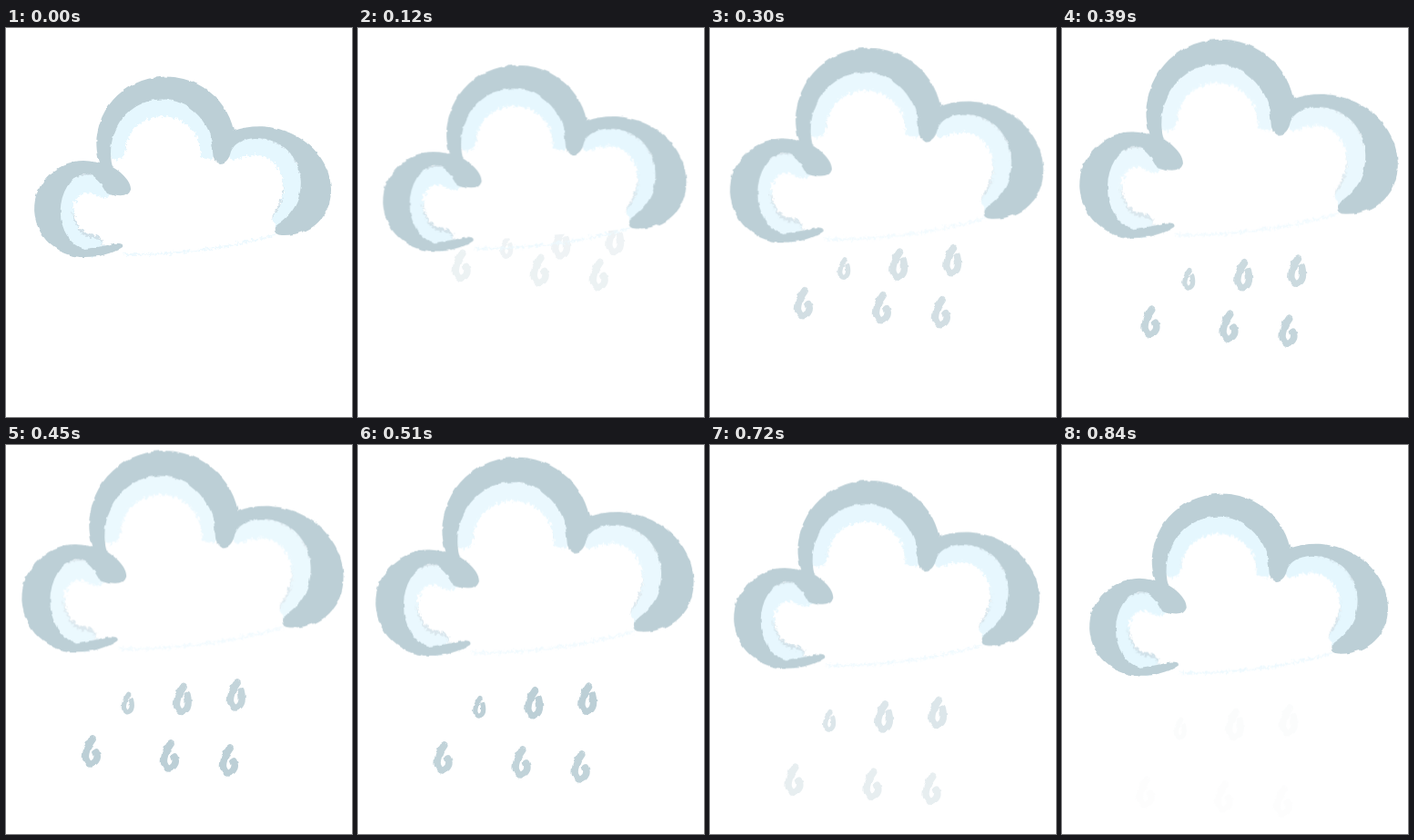
Animation, 380 px wide and 428 px high, one loop 870 ms. Source, as an HTML page:

```html
<!DOCTYPE html>
<html lang="en">
<head>
<meta charset="utf-8">
<title>Rain cloud</title>
<style>
html, body { margin: 0; width: 100%; height: 100%; overflow: hidden; background: #fff; }
svg { display: block; width: 380px; height: 428px; }
path { fill: none; stroke-linecap: round; stroke-linejoin: round; }
</style>
</head>
<body>
<svg viewBox="0 0 380 428">
  <defs>
    <filter id="brush" x="-100%" y="-100%" width="300%" height="300%" color-interpolation-filters="sRGB">
      <feTurbulence type="fractalNoise" baseFrequency=".11" numOctaves="2" seed="4"/>
      <feDisplacementMap in="SourceGraphic" scale="3.5" xChannelSelector="R" yChannelSelector="G"/>
    </filter>
    <filter id="chalk" x="-20%" y="-20%" width="140%" height="140%" color-interpolation-filters="sRGB">
      <feTurbulence type="fractalNoise" baseFrequency=".3" numOctaves="3" seed="9"/>
      <feDisplacementMap in="SourceGraphic" scale="8" xChannelSelector="R" yChannelSelector="G"/>
    </filter>
  </defs>
  <g id="rain"></g>
  <g id="cloud">
    <g id="body"></g>
    <g id="glow" filter="url(#chalk)"></g>
    <g id="rim" filter="url(#brush)"></g>
  </g>
</svg>
<script>
const GREY = '#bccfd6', PALE = '#e5f7fe', MIST = '#d0e0e8';
const STEP = 30, LOOP = 870, PEAK = 450, END = 840;
const $ = id => document.getElementById(id);
const clamp = v => Math.max(0, Math.min(1, v));
const mix = (a, b, u) => a + (b - a) * u;

function add(parent, d, attrs) {
  const path = document.createElementNS('http://www.w3.org/2000/svg', 'path');
  path.setAttribute('d', d);
  for (const name in attrs) path.setAttribute(name, attrs[name]);
  return $(parent).appendChild(path);
}
const fill = (parent, d, color) => add(parent, d, { style: 'fill:' + color });
const stroke = (parent, d, color, width, more) =>
  add(parent, d, { stroke: color, 'stroke-width': width, ...more });

// Three lobes seen from outside, then the way back along their inner edges
const outside = `M128,241 Q112,252 86,252 A54,53 0 1 1 103,149 A76,73 0 1 1 250,113
  C300,95 357,130 357,178 C357,208 335,229 303,228`;
const inside = `Q293,228 295,218 C340,195 332,121 273,121 Q252,123 247,136
  Q244,149 235,149 Q227,147 227,136 A56,59 0 1 0 117,153
  C117,153 138,165 137,178 Q133,190 111,182 C105,172 100,161 86,160
  A31,42 0 0 0 86,243 Q105,241 118,237 Q130,236 128,241Z`;
const lobes = [
  'M106,174 C75,155 55,190 67,216 Q76,238 96,238',
  'M121,132 A51,48 0 0 1 223,132',
  'M251,132 C300,110 335,165 303,208'
];

fill('body', outside, '#fff');
for (const lobe of lobes) {
  stroke('glow', lobe, MIST, 21);
  stroke('glow', lobe, PALE, 20, { transform: 'translate(0 3)' });
}
stroke('glow', 'M130,249 Q220,250 297,227', '#edf9fe', 2);
fill('rim', outside + inside, GREY);

// Two rows of drops: start, shift at the peak and at the end, opacity by time
const rows = [
  { xs: [174, 234, 293], y: 226, dy: -4.5, peak: [-40, 58], end: [-44, 86], hook: -5,
    alpha: t => Math.min(t / 510, (855 - t) / 266) },
  { xs: [121, 207, 272], y: 234, dy: 5, peak: [-27, 103], end: [-29, 148], hook: 1,
    alpha: t => Math.min(t / 450, (848 - t) / 370) }
];
const drops = rows.flatMap((row, r) => row.xs.map((x, i) => {
  const shape = `M1,-14 C-4,-8 -8,4 -6,9 S-1,15 2,13 S8,7 5,${row.hook}`;
  const node = stroke('rain', shape, GREY, 7.5, { filter: 'url(#brush)' });
  return { node, row, x, y: row.y + row.dy * i, size: r + i ? 1 : .7 };
}));

function draw(t) {
  const falling = t > PEAK;
  const u = clamp(falling ? (t - PEAK) / (END - PEAK) : t / PEAK);
  const k = falling ? 1 - u : u;
  const slack = falling ? u : 0;
  const sx = 1 + .084 * k + .006 * slack, sy = 1 + .116 * k + .009 * slack;
  $('cloud').setAttribute('transform',
    `translate(194.5 ${54 - 47.3 * k}) scale(${sx} ${sy}) translate(-194.5 -54)`);
  $('glow').setAttribute('opacity', 1 - .25 * k);

  for (const { node, row, x, y, size } of drops) {
    const [dx, dy] = row.peak.map((v, n) => falling ? mix(v, row.end[n], u) : v * u);
    node.setAttribute('transform', `translate(${x + dx} ${y + dy}) scale(${size})`);
    node.setAttribute('opacity', clamp(row.alpha(t)));
  }
}

function tick() {
  draw(Math.floor(performance.now() % LOOP / STEP) * STEP);
  requestAnimationFrame(tick);
}
tick();
</script>
</body>
</html>
```
